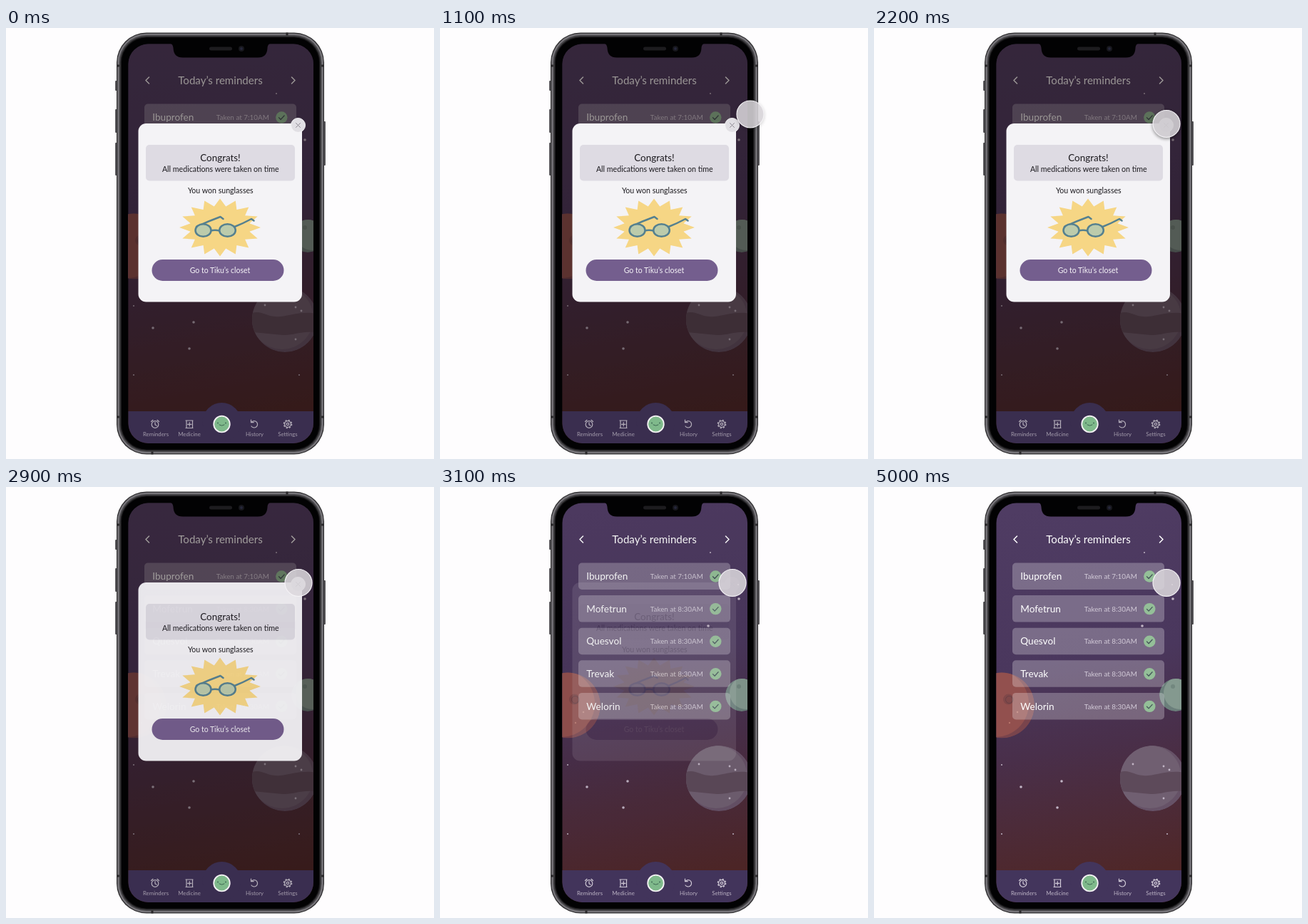
Write an HTML page that moves like this. It is 600 px wide and 605 px high and loops after 5.1 s.

```html
<!DOCTYPE html>
<html lang="en">
<head>
<meta charset="utf-8">
<title>Medication reminders</title>
<style>
  html, body { margin: 0; width: 100%; height: 100%; overflow: hidden; background: #fefdfe; }
  svg { display: block; width: 600px; height: 605px; font-family: Lato, "Open Sans", sans-serif; }
  .mid { text-anchor: middle; }
  .end { text-anchor: end; }
  .line { fill: none; stroke-linecap: round; stroke-linejoin: round; }
</style>
</head>
<body>
<svg viewBox="0 0 600 605">
  <defs>
    <linearGradient id="sky" gradientUnits="userSpaceOnUse" x1="250" y1="22" x2="345" y2="545">
      <stop offset="0" stop-color="#4f3c63"/>
      <stop offset=".42" stop-color="#4a375d"/>
      <stop offset=".65" stop-color="#492f4a"/>
      <stop offset="1" stop-color="#4f2728"/>
    </linearGradient>
    <clipPath id="screenClip"><rect x="171.5" y="22.5" width="259.5" height="560.5" rx="28"/></clipPath>
    <clipPath id="redClip"><circle cx="179" cy="306.500" r="46"/></clipPath>
    <clipPath id="greenClip"><circle cx="423" cy="292" r="23"/></clipPath>
    <clipPath id="greyClip"><circle cx="391" cy="409" r="46"/></clipPath>
    <filter id="soft" x="-50%" y="-50%" width="200%" height="200%"><feGaussianBlur stdDeviation="2.2"/></filter>
  </defs>

  <!-- phone body -->
  <g fill="#59575b">
    <rect x="153" y="74" width="3" height="14" rx="1"/>
    <rect x="153" y="114" width="3" height="33" rx="1"/>
    <rect x="153" y="161" width="3" height="46" rx="1"/>
    <rect x="445" y="131" width="3" height="62" rx="1"/>
  </g>
  <g id="rims"></g>
  <path d="M155 53h4M442 53h4M155 546h4M442 546h4M394 6.500v4M205 594.500v4" stroke="#2a292b" stroke-width="3"/>

  <g clip-path="url(#screenClip)">
    <rect x="171" y="22" width="261" height="562" fill="url(#sky)"/>
    <g clip-path="url(#redClip)">
      <circle cx="179" cy="306.500" r="46" fill="#79444c"/>
      <circle cx="170" cy="304" r="47" fill="#92504e"/>
      <circle cx="188.500" cy="298" r="7.500" fill="#804849"/>
      <circle cx="189.500" cy="298.500" r="5" fill="none" stroke="#663f45"/>
      <g fill="#b8756b"><circle cx="201" cy="316" r="1.200"/><circle cx="190" cy="331" r="1.200"/></g>
    </g>
    <g clip-path="url(#greenClip)">
      <circle cx="423" cy="292" r="23" fill="#6b7f7b"/>
      <circle cx="429" cy="289" r="23" fill="#84998f"/>
      <circle cx="419" cy="280" r="3" fill="#72877f"/>
    </g>
    <g clip-path="url(#greyClip)">
      <circle cx="391" cy="409" r="46" fill="#665267"/>
      <circle cx="387" cy="407" r="44" fill="#705f71"/>
      <path d="M345 400C360 396 366 407 384 405S414 397 437 401V428C416 424 404 432 388 431S362 428 345 427Z" fill="#5d4a5a"/>
    </g>
    <g id="stars" fill="#c2b6c6"></g>

    <g class="line" stroke="#fff" stroke-width="1.500">
      <path d="M200.500 69l-4.500 4.500 4.500 4.500M400.500 69l4.500 4.500-4.500 4.500"/>
    </g>
    <text x="300.500" y="78.500" class="mid" font-size="15.100" fill="#fff">Today’s reminders</text>
    <g id="rows"></g>

    <rect id="dim" x="171" y="22" width="261" height="562" fill="#140b08"/>

    <g id="nav">
      <g fill="#43355c">
        <rect x="171" y="538" width="261" height="46"/>
        <circle cx="302.500" cy="553" r="27"/>
      </g>
      <g class="line" stroke="#d3ccd9" stroke-width="1.200">
        <circle cx="209" cy="556.500" r="4.800"/>
        <path d="M209 553.500v3.200l2 1.400M203.500 552.500l2.500-2.200M214.500 552.500l-2.500-2.200"/>
        <path d="M252 551h10M253 551v10.500h8.500V551M252 561.500h10M257.200 553.500v5.500M254.500 556.300h5.500"/>
        <path d="M344.500 553a4.700 4.700 0 1 1-.5 6M343.500 550v3.700h3.700"/>
        <circle cx="395" cy="556" r="4.300"/>
        <circle cx="395" cy="556" r="1.700"/>
        <circle cx="395" cy="556" r="5.500" stroke-width="1.600" stroke-linecap="butt" stroke-dasharray="2.200 2.120"/>
      </g>
      <g id="labels" class="mid" font-size="7.800" fill="#bdb4c6"></g>
    </g>
    <circle cx="302.500" cy="556" r="11.300" fill="#7fb98b" stroke="#f4f2f4" stroke-width="1.800"/>
    <g fill="#3e6652"><circle cx="297" cy="554.500" r=".9"/><circle cx="308" cy="554.500" r=".9"/></g>
    <path class="line" d="M299 557q3.500 2.500 7 0" stroke="#3e6652"/>
  </g>

  <!-- notch -->
  <path d="M229 21C233 22.500 234 24 234.500 28C235 37 239 41.500 248 41.500H353C362 41.500 366 37 366.500 28C367 24 368 22.500 372 21Z" fill="#020203"/>
  <rect x="285" y="26.500" width="32" height="5" rx="2.500" fill="#1d1c1f"/>
  <circle cx="330" cy="29" r="4" fill="#17171c"/>
  <circle cx="330" cy="29" r="2" fill="#25263a"/>

  <g id="modal">
    <rect x="185.500" y="134" width="229.500" height="250.500" rx="11" fill="#f4f3f6"/>
    <rect x="196" y="164" width="209" height="50.500" rx="5" fill="#dedbe3"/>
    <g class="mid" fill="#1c1a1f">
      <text x="300.500" y="186.500" font-size="13.400">Congrats!</text>
      <text x="300.800" y="201.500" font-size="10.650">All medications were taken on time</text>
      <text x="300.800" y="232" font-size="10.600">You won sunglasses</text>
    </g>
    <path id="burst" fill="#f6d685"/>
    <g class="line" stroke="#55808f" stroke-width="2.500">
      <path d="M267 279Q284 271 300.500 265L304.500 268M320.500 279Q333 274 344 268L347.500 270.500M287 284.500Q293 283 299 284.500"/>
      <ellipse cx="276.500" cy="284" rx="11" ry="8.800" fill="#bccbab"/>
      <ellipse cx="310.500" cy="284" rx="11.300" ry="8.800" fill="#bccbab"/>
    </g>
    <rect x="204.500" y="325" width="185" height="30" rx="15" fill="#745e8e"/>
    <text x="300" y="343.500" class="mid" font-size="10.500" fill="#f6f4f8">Go to Tiku’s closet</text>
    <circle cx="409.500" cy="136.500" r="10" fill="#e1dfe4" stroke="#f7f6f8"/>
    <path class="line" d="M406.500 133.500l6 6M412.500 133.500l-6 6" stroke="#8d8992"/>
  </g>

  <g id="pointer">
    <circle id="shadow" cy="1.500" r="20" fill="#000" opacity=".3" filter="url(#soft)"/>
    <circle r="19" fill="#dcd9de" fill-opacity=".86" stroke="#f5f3f6" stroke-width="1.200"/>
  </g>
</svg>
<script>
const LOOP = 5100, STEP = 100;
const $ = id => document.getElementById(id);

// nested metal rims: inset, colour
const rims = [[0, '#2b2a2c'], [1.2, '#77757a'], [3.6, '#434245'], [5.5, '#1a191b'], [7, '#020203']];
$('rims').innerHTML = rims.map(([d, fill]) =>
  `<rect x="${155 + d}" y="${6.5 + d}" width="${291 - 2 * d}" height="${592 - 2 * d}" rx="${42 - d}" fill="${fill}"/>`).join('');

// x, y, radius
const stars = [
  [379, 92, 1], [419, 157, 1.8], [376, 195, 1.8], [206, 421, 1.8], [263, 413, 1.8],
  [257, 450, 1.8], [179, 390, 1], [179, 487, 1], [411, 487, 1], [363, 389, 1.4],
  [406, 392, 1.4], [414, 397, 1.4], [406, 437, 1.4], [418, 137, 1]
];
$('stars').innerHTML = stars.map(([x, y, r]) => `<circle cx="${x}" cy="${y}" r="${r}"/>`).join('');

const meds = [['Ibuprofen', '7:10'], ['Mofetrun', '8:30'], ['Quesvol', '8:30'], ['Trevak', '8:30'], ['Welorin', '8:30']];
$('rows').innerHTML = meds.map(([name, time], i) => `
  <g transform="translate(194 ${106.5 + i * 45.6})">
    <rect width="213" height="37.5" rx="5" fill="#fff" fill-opacity=".26"/>
    <text x="11.300" y="23.700" font-size="13.600" fill="#fff">${name}</text>
    <text x="174.800" y="22.700" class="end" font-size="9.900" fill="#d2cad8">Taken at ${time}AM</text>
    <circle cx="192.300" cy="19" r="8.200" fill="#94bf98"/>
    <path class="line" d="M188.500 19.300l2.600 2.700 5-5.500" stroke="#45565a" stroke-width="1.300"/>
  </g>`).join('');

const tabs = [['Reminders', 210], ['Medicine', 257], ['History', 348.5], ['Settings', 395]];
$('labels').innerHTML = tabs.map(([name, x]) => `<text x="${x}" y="573">${name}</text>`).join('');

const spikes = 16;
$('burst').setAttribute('d', 'M' + Array.from({ length: spikes * 2 }, (_, i) => {
  const a = (i / spikes - 0.5) * Math.PI, k = i % 2 ? 0.74 : 1;
  return `${(300 + 57 * k * Math.cos(a)).toFixed(1)} ${(280 + 40.5 * k * Math.sin(a)).toFixed(1)}`;
}).join('L') + 'Z');

// time, values...
const path = [
  [700, 625, 122], [800, 578, 118], [900, 512, 116], [1000, 463, 117],
  [1100, 435, 121], [1200, 427, 125], [1400, 415, 131], [1700, 410, 134.5]
];
const fade = [[2800, 1], [2900, 0.94], [3000, 0.62], [3100, 0.1], [3200, 0]];
const shade = [[1100, 0.15], [1700, 0.2], [2000, 0.38], [2500, 0.38], [2900, 0]];

function at(table, t) {
  const n = table.findIndex(row => row[0] > t);
  if (n === 0) return table[0].slice(1);
  if (n < 0) return table[table.length - 1].slice(1);
  const a = table[n - 1], b = table[n], u = (t - a[0]) / (b[0] - a[0]);
  return a.slice(1).map((v, i) => v + (b[i + 1] - v) * u);
}

function render(t) {
  const [open] = at(fade, t), [x, y] = at(path, t);
  $('modal').style.opacity = open;
  $('dim').style.opacity = 0.43 * open;
  $('nav').style.filter = `brightness(${1 - 0.14 * open})`;
  $('pointer').setAttribute('transform', `translate(${x} ${y})`);
  $('pointer').style.visibility = t < 700 ? 'hidden' : 'visible';
  $('shadow').style.opacity = at(shade, t)[0];
}

const start = performance.now();
function tick() {
  const t = (performance.now() - start) % LOOP;
  render(Math.floor(t / STEP) * STEP);
  requestAnimationFrame(tick);
}
tick();
</script>
</body>
</html>
```
